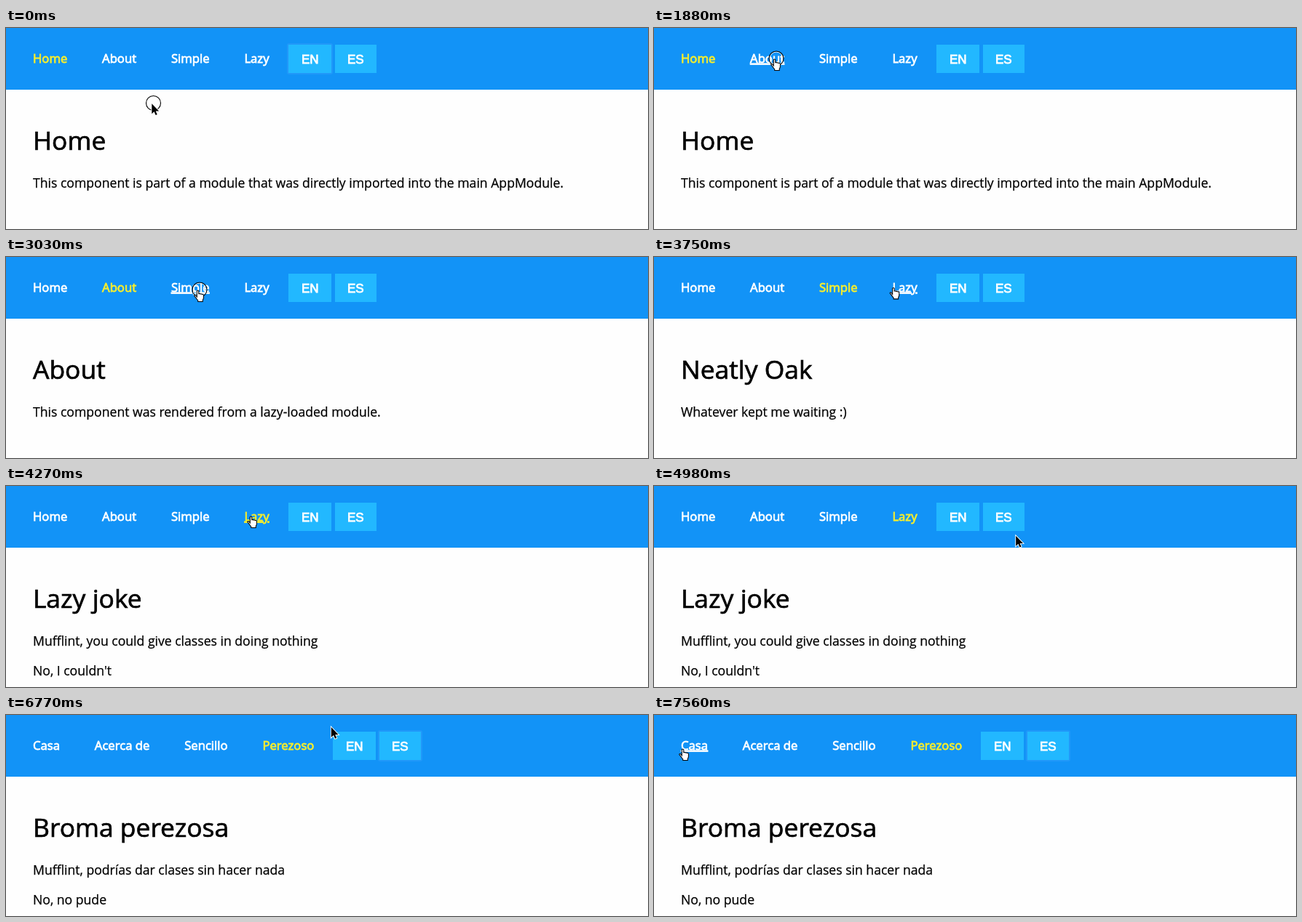
Recreate the animation shown at these times as an HTML page. Size 882 by 277 pixels, loop 8000 ms.

```html
<!DOCTYPE html>
<html lang="en">
<head>
<meta charset="utf-8">
<title>Translated pages</title>
<style>
  html, body { margin: 0; width: 100%; height: 100%; overflow: hidden; background: #fefefe; }
  svg { display: block; width: 882px; height: 277px; }
  text { font: 17.6px "Open Sans", sans-serif; stroke: #000; stroke-width: .25; }
  #title { font-size: 35.4px; stroke-width: .7; }
  .link { font-size: 16.7px; fill: #fff; stroke: #fff; stroke-width: .8; }
  .active { fill: #f8ee2b; stroke: #f8ee2b; }
  .hover { text-decoration: underline; }
  .label { font: 17px "Liberation Sans", Arial, sans-serif; fill: #fff; stroke: #fff; stroke-width: .8; text-anchor: middle; }
  .ring { fill: none; stroke: #309dfb; stroke-width: 2; opacity: .5; }
</style>
</head>
<body>
<svg viewBox="0 0 882 277">
  <rect width="882" height="85" fill="#1293f7"/>
  <g id="links"></g>
  <g id="buttons">
    <rect class="ring" id="ringEN" x="-1" y="22" width="61" height="41" rx="2"/>
    <rect class="ring" id="ringES" x="63" y="22" width="59" height="41" rx="2"/>
    <rect y="23" width="59" height="39" fill="#22b8ff"/>
    <rect x="64" y="23" width="57" height="39" fill="#22b8ff"/>
    <text class="label" x="29.8" y="48.7">EN</text>
    <text class="label" x="92.3" y="48.7">ES</text>
  </g>
  <text id="title" x="37" y="167.5"></text>
  <text id="line1" x="37" y="220"></text>
  <text id="line2" x="37" y="261"></text>
  <g id="cursor">
    <g id="press" fill="none">
      <circle r="9" stroke="#fff"/>
      <circle r="10" stroke="#000" stroke-width="1.1"/>
    </g>
    <path id="arrow" transform="translate(-2.2 .8)" stroke="#fff" paint-order="stroke" stroke-width="1.8"
      d="M0 0V14L3.2 11 5.3 15.8 7.4 14.9 5.4 10.2H9.8Z"/>
    <path id="hand" transform="translate(-8 .5) scale(.95)" fill="#fff" stroke="#000" stroke-width="1.1"
      d="M4.5 10V2q0-1.4 1.3-1.4T7.1 2V6q0-1 1.2-1T9.5 6.3q.2-.8 1.2-.8t1.2 1.2q.2-.6 1-.6t1.2 1.2V11q0 2-1.2 3.5V16.8H6V15Q4 13 2.5 10.5L.9 8.6q-.3-1.2.8-1.3 .8 0 1.5.9Z"/>
  </g>
</svg>
<script>
const LOOP = 8000, STEPS = 90;   // the screen refreshes in even steps
const LEFT = 37, LINK_GAP = 47.8, BUTTON_GAP = 26;
const $ = id => document.getElementById(id);

const menus = {
  en: ['Home', 'About', 'Simple', 'Lazy'],
  es: ['Casa', 'Acerca de', 'Sencillo', 'Perezoso']
};

// Each page opens one step after its click; focus is the button that keeps a ring
const pages = [
  { click: 0, lang: 'en', active: 0, focus: 'EN',
    text: ['Home', 'This component is part of a module that was directly imported into the main AppModule.', ''] },
  { click: 21, lang: 'en', active: 1,
    text: ['About', 'This component was rendered from a lazy-loaded module.', ''] },
  { click: 34, lang: 'en', active: 2,
    text: ['Neatly Oak', 'Whatever kept me waiting :)', ''] },
  { click: 47, lang: 'en', active: 3,
    text: ['Lazy joke', 'Mufflint, you could give classes in doing nothing', "No, I couldn't"] },
  { click: 66, lang: 'es', active: 3, focus: 'ES',
    text: ['Broma perezosa', 'Mufflint, podrías dar clases sin hacer nada', 'No, no pude'] }
];

// Eased pointer moves; the pointer rests in between
const origin = { x: 202.5, y: 103.5 };
const moves = [
  { start: 14, end: 18, x: 168, y: 42 },   // About
  { start: 22, end: 29, x: 266, y: 45 },   // Simple
  { start: 34, end: 44, x: 339, y: 41 },   // Lazy
  { start: 52, end: 57, x: 518, y: 71 },   // past the buttons
  { start: 57, end: 61, x: 499, y: 40 },   // ES
  { start: 75, end: 76, x: 449, y: 16 },
  { start: 76, end: 78, x: 310, y: -25 },  // out at the top
  { start: 78, end: 79, x: 26, y: -25 },
  { start: 79, end: 80, x: 26, y: 4 },
  { start: 80, end: 85, x: 42, y: 46 }     // Casa
];

const links = menus.en.map(() => {
  const link = document.createElementNS('http://www.w3.org/2000/svg', 'text');
  link.setAttribute('y', 47.8);
  return $('links').appendChild(link);
});

function pointerAt(step) {
  let { x, y } = origin;
  for (const move of moves) {
    const t = Math.min(1, Math.max(0, (step - move.start) / (move.end - move.start)));
    const eased = t * t * (3 - 2 * t);
    x += (move.x - x) * eased;
    y += (move.y - y) * eased;
  }
  return { x, y };
}

const show = (id, visible) => $(id).setAttribute('visibility', visible ? 'visible' : 'hidden');

function draw(step) {
  const clicked = pages.filter(p => p.click <= step).pop();
  const page = pages.filter(p => p.click < step).pop() ?? pages[0];
  const pointer = pointerAt(step);
  let overLink = false, x = LEFT, right;

  links.forEach((link, i) => {
    link.textContent = menus[page.lang][i];
    link.setAttribute('x', x);
    link.setAttribute('class', 'link' + (i === page.active ? ' active' : ''));
    right = x + link.getComputedTextLength();
    const hover = pointer.y > 30 && pointer.y < 56 && pointer.x >= x && pointer.x <= right;
    link.classList.toggle('hover', hover);
    overLink ||= hover;
    x = right + LINK_GAP;
  });

  ['title', 'line1', 'line2'].forEach((id, i) => $(id).textContent = page.text[i]);
  $('buttons').setAttribute('transform', `translate(${Math.round(right + BUTTON_GAP)})`);
  show('ringEN', clicked.focus === 'EN');
  show('ringES', clicked.focus === 'ES');

  $('cursor').setAttribute('transform', `translate(${pointer.x} ${pointer.y})`);
  show('press', clicked.click === step);
  show('hand', overLink);
  show('arrow', !overLink);
}

let start, shown = -1;
function tick(now) {
  start ??= now;
  const step = Math.floor((now - start) % LOOP / LOOP * STEPS);
  if (step !== shown) draw(shown = step);
  requestAnimationFrame(tick);
}
draw(0);
requestAnimationFrame(tick);
</script>
</body>
</html>
```
